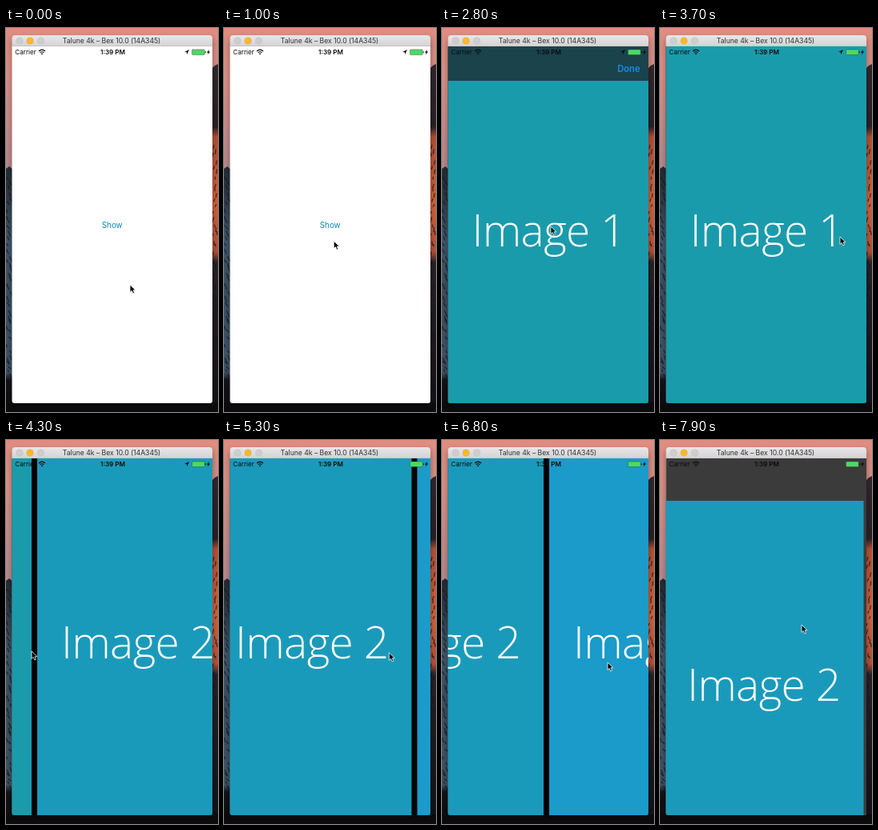
An HTML page that plays this animation: 265 px wide and 480 px high, repeating every 8000 ms.

```html
<!DOCTYPE html>
<html lang="en">
<head>
<meta charset="utf-8">
<title>Image viewer demo</title>
<style>
html, body { margin: 0; width: 100%; height: 100%; overflow: hidden; background: #111; }
svg { display: block; width: 265px; height: 480px; }
text { font-family: Inter, "Open Sans", sans-serif; }
.caption { font: 300 55px "Open Sans", "Noto Sans", sans-serif; letter-spacing: -.7px; fill: #fff; text-anchor: middle; }
.status { font-size: 8.1px; fill: #0b0b0b; }
</style>
</head>
<body>
<svg viewBox="0 0 265 480">
  <defs>
    <linearGradient id="sky" x2="0" y2="1">
      <stop offset="0" stop-color="#e08d80"/>
      <stop offset=".12" stop-color="#dc9288"/>
      <stop offset=".36" stop-color="#b98a8e"/>
    </linearGradient>
    <linearGradient id="slate" x2="0" y2="1">
      <stop offset="0" stop-color="#232a34"/>
      <stop offset=".1" stop-color="#2c3742"/>
      <stop offset=".3" stop-color="#40586b"/>
      <stop offset=".5" stop-color="#3a5062"/>
      <stop offset=".84" stop-color="#3e5466"/>
      <stop offset=".87" stop-color="#121318"/>
      <stop offset="1" stop-color="#0d0b0e"/>
    </linearGradient>
    <linearGradient id="rock" x2="0" y2="1">
      <stop offset="0" stop-color="#33282e"/>
      <stop offset=".18" stop-color="#2a2126"/>
      <stop offset=".21" stop-color="#b85236"/>
      <stop offset=".4" stop-color="#d4643e"/>
      <stop offset=".54" stop-color="#b85238"/>
      <stop offset=".57" stop-color="#2b2328"/>
      <stop offset="1" stop-color="#121016"/>
    </linearGradient>
    <linearGradient id="bar" x2="0" y2="1">
      <stop offset="0" stop-color="#e8e6e8"/>
      <stop offset="1" stop-color="#d3d1d3"/>
    </linearGradient>
    <filter id="blur" x="-20%" y="-20%" width="140%" height="140%"><feGaussianBlur stdDeviation="4"/></filter>
    <clipPath id="window"><path d="M7.5 23H258V466q0 3-3 3H10.5q-3 0-3-3Z"/></clipPath>
  </defs>

  <rect width="265" height="480" fill="url(#sky)"/>
  <path d="M0 176l4-3 6 5V480H0Z" fill="url(#slate)"/>
  <path d="M256 52l5-5 4-2V480H256Z" fill="url(#rock)"/>
  <path id="cracks" stroke="#17181e" stroke-width="1.3" opacity=".75"/>
  <rect y="468" width="265" height="12" fill="#0d0b0e"/>
  <rect x="7" y="13" width="252" height="460" rx="4" opacity=".32" filter="url(#blur)"/>

  <path d="M7.5 24V13q0-4 4-4H254q4 0 4 4V24Z" fill="url(#bar)"/>
  <path d="M7.5 22.7H258" stroke="#b6b4b6" stroke-width=".6"/>
  <g stroke-width=".5">
    <circle cx="17" cy="16" r="4.1" fill="#cfcdcf" stroke="#bab8ba"/>
    <circle cx="30" cy="16" r="4.1" fill="#fdb827" stroke="#dea032"/>
    <circle cx="43.5" cy="16" r="4.1" fill="#cfcdcf" stroke="#bab8ba"/>
  </g>
  <text x="132" y="19.4" text-anchor="middle" font-size="8.6" fill="#303030">Talune 4k – Bex 10.0 (14A345)</text>

  <g clip-path="url(#window)">
    <rect x="7" y="23" width="252" height="447" fill="#fff"/>
    <text id="show" x="132.7" y="250" text-anchor="middle" font-size="9.8" fill="#0b86b8">Show</text>
    <g id="sheet">
      <rect id="dim" x="7" y="23" width="252" height="447"/>
      <g id="pages"></g>
      <g id="nav">
        <rect x="7" y="23" width="252" height="43" fill="#1b1f24" fill-opacity=".7"/>
        <text x="247.5" y="55.3" text-anchor="end" font-size="11.2" font-weight="600" fill="#168cf0">Done</text>
      </g>
    </g>
    <g class="status">
      <text x="11.3" y="33">Carrier</text>
      <text x="133.5" y="33" text-anchor="middle" font-weight="600">1:39 PM</text>
      <path d="M41 29q4-3.6 8 0M42.6 30.8q2.4-2.1 4.8 0" fill="none" stroke="#0b0b0b" stroke-width="1.2"/>
      <path d="M43.7 32q1.3-1 2.6 0L45 33.5Z"/>
      <path id="arrow" d="M229 27l-6 3 3 .2.2 3Z"/>
      <rect x="232.5" y="26.9" width="15.8" height="6.7" rx="1.3" fill="#4cd964" stroke="#2c3a30" stroke-opacity=".7" stroke-width=".6"/>
      <path d="M248.8 29v2.4q1-.2 1-1.2t-1-1.2Z"/>
      <path d="M254 26.8l-3 3.9h1.8l-.8 2.9 3.2-4h-1.9Z"/>
    </g>
  </g>
  <path id="cursor" d="M0 0V9.4L2.2 7.4 3.8 11 5.5 10.2 4 6.8H7Z" stroke="#fff" stroke-width=".8" stroke-linejoin="round"/>
</svg>
<script>
const LOOP = 8000, STEP = 100;
const WIDTH = 250.5, STRIDE = 257.5, HEIGHT = 446;
const COLORS = ['#1a9bab', '#1a9aba', '#1a9bca'];
const $ = id => document.getElementById(id);

const ease = {
  linear: u => u,
  inOut: u => u * u * (3 - 2 * u),
  out: u => 1 - (1 - u) ** 3
};

// Rows are [time, ...values, easing into this row].
const CURSOR = [
  [0, 155, 321], [400, 155, 321], [1300, 131, 247, 'inOut'], [1900, 131, 247],
  [2500, 136, 248, 'inOut'], [3200, 136, 248], [3700, 225, 261, 'inOut'],
  [3800, 225, 261], [4300, 32, 264, 'inOut'], [4500, 32, 264],
  [5100, 226, 266, 'inOut'], [5200, 226, 266], [5700, 37, 265, 'inOut'],
  [6100, 37, 265], [6450, 80, 274, 'inOut'], [6800, 207, 278, 'inOut'],
  [6950, 224, 278, 'out'], [7050, 224, 278], [7400, 180, 178, 'inOut'],
  [7500, 180, 178], [7900, 177, 231, 'inOut']
];
const SCROLL = [
  [0, 0], [3800, 0], [4300, 226, 'inOut'], [4700, STRIDE, 'out'],
  [5200, STRIDE], [5700, STRIDE + 226, 'inOut'], [6000, STRIDE * 2, 'out'],
  [6450, STRIDE * 2], [6800, 388.5, 'inOut'], [7200, STRIDE, 'out']
];
const PULL = [[0, 0, 0], [7500, 0, 0], [7900, -3.5, 53, 'inOut']];
const NAV = [[0, 1], [3000, 1], [3300, 0, 'linear']];

function sample(rows, t) {
  const i = rows.findIndex(r => r[0] > t);
  const nums = r => r.slice(1).filter(v => typeof v === 'number');
  if (i < 0) return nums(rows[rows.length - 1]);
  const a = rows[i - 1], b = rows[i], last = b[b.length - 1];
  const u = (ease[last] || ease.linear)((t - a[0]) / (b[0] - a[0]));
  const end = nums(b);
  return nums(a).map((v, k) => v + (end[k] - v) * u);
}

function spring(t, start, rate) {
  const x = Math.max(0, t - start) / 1000 * rate;
  return 1 - (1 + x) * Math.exp(-x);
}

// Short slanted cracks in the rock on either side of the window.
function cracks() {
  let seed = 7, d = '';
  const rnd = () => (seed = seed * 16807 % 2147483647) / 2147483647;
  for (let y = 186; y < 440; y += 3 + rnd() * 7) {
    d += `M${rnd() * 5} ${y}l${1 + rnd() * 3} ${3 + rnd() * 5}`;
    d += `M${259 + rnd() * 5} ${y - 40}l${1 - rnd() * 3} ${3 + rnd() * 4}`;
  }
  return d;
}

const move = (el, x, y) => el.setAttribute('transform', `translate(${x.toFixed(2)} ${y.toFixed(2)})`);

$('cracks').setAttribute('d', cracks());
$('pages').innerHTML = COLORS.map((color, i) => `<g transform="translate(${i * STRIDE} 0)">
  <rect x="7.5" y="23" width="${WIDTH}" height="${HEIGHT}" fill="${color}"/>
  <text class="caption" x="133.2" y="273">Image ${i + 1}</text></g>`).join('');

function draw(t) {
  const rise = spring(t, 1739, 15);
  const [dx, dy] = sample(PULL, t);
  move($('sheet'), 0, HEIGHT * (1 - rise));
  $('sheet').style.display = rise > 0 ? '' : 'none';
  move($('pages'), dx - sample(SCROLL, t)[0], dy);
  $('dim').setAttribute('opacity', 1 - dy / 230);
  $('nav').setAttribute('opacity', sample(NAV, t)[0]);
  $('show').setAttribute('opacity', t >= 1500 ? .4 : 1);
  $('arrow').style.display = t < 5200 ? '' : 'none';
  move($('cursor'), ...sample(CURSOR, t));
}

const begin = performance.now();
function tick() {
  const t = (performance.now() - begin) % LOOP;
  draw(Math.floor(t / STEP) * STEP);
  requestAnimationFrame(tick);
}
tick();
</script>
</body>
</html>
```
